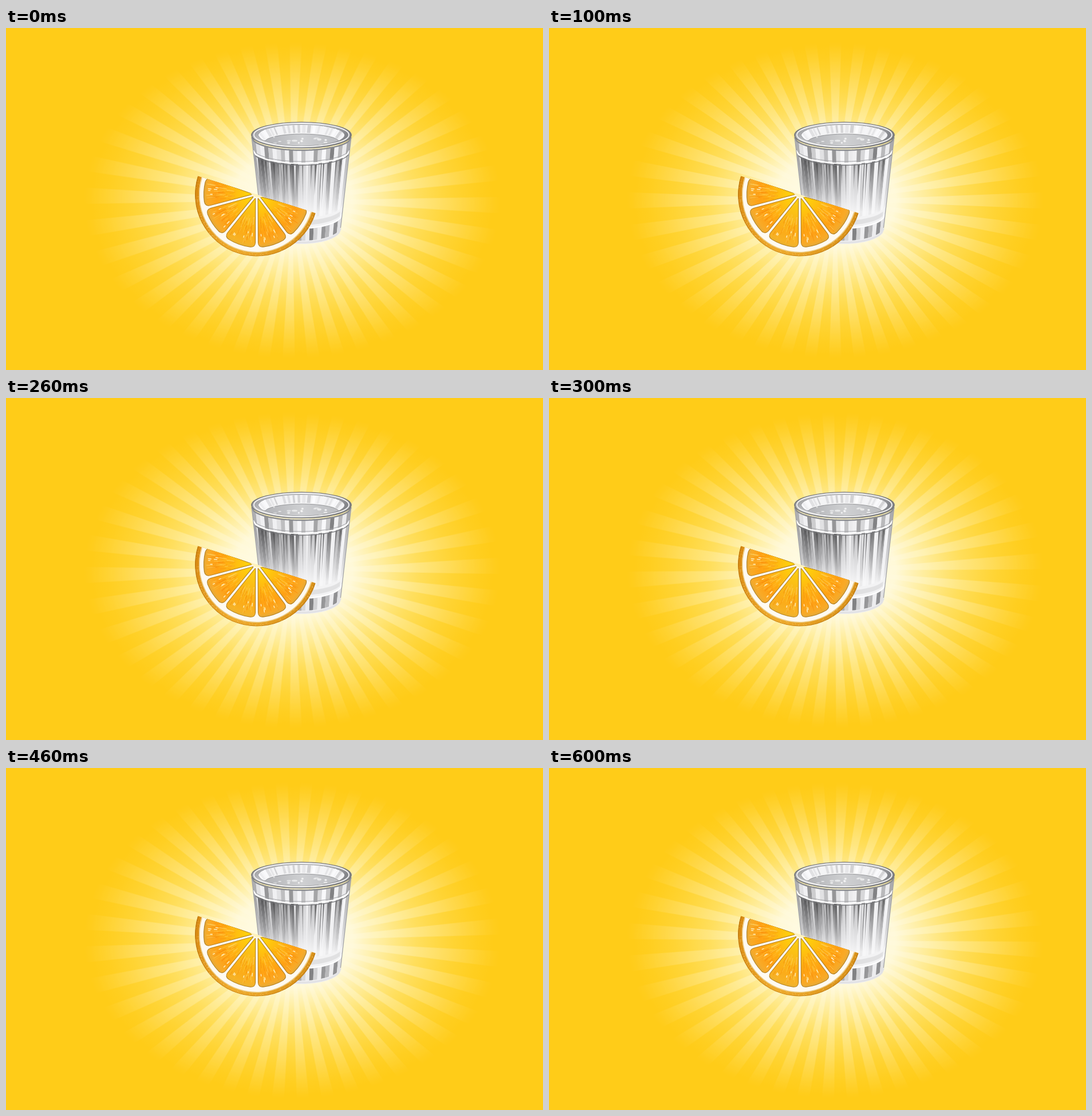
Animation of 938 by 597 pixels, one loop 0.7 s. Source, as an HTML page:

```html
<!DOCTYPE html>
<html lang="en">
<head>
<meta charset="utf-8">
<title>Shot and orange</title>
<style>
  html, body { margin: 0; width: 100%; height: 100%; overflow: hidden; background: #ffcc18; }
  svg { display: block; width: 100vw; height: 100vh; }
  /* One ray spacing per loop, so the turn is seamless */
  #rays { transform-origin: 500px 301px; animation: turn 700ms steps(7) infinite; }
  @keyframes turn {
    from { transform: rotate(1.3deg); }
    to { transform: rotate(-7.7deg); }
  }
</style>
</head>
<body>
<svg viewBox="0 0 938 597" preserveAspectRatio="none">
  <defs>
    <radialGradient id="glow">
      <stop offset="0" stop-color="#fffef4"/>
      <stop offset=".3" stop-color="#fffce6" stop-opacity=".93"/>
      <stop offset=".46" stop-color="#fff9cc" stop-opacity=".7"/>
      <stop offset=".62" stop-color="#fff6b4" stop-opacity=".44"/>
      <stop offset=".8" stop-color="#fff3a0" stop-opacity=".2"/>
      <stop offset=".92" stop-color="#fff3a0" stop-opacity=".06"/>
      <stop offset="1" stop-color="#fff3a0" stop-opacity="0"/>
    </radialGradient>
    <radialGradient id="fade">
      <stop offset=".15" stop-color="#fff" stop-opacity=".45"/>
      <stop offset=".5" stop-color="#fff" stop-opacity=".34"/>
      <stop offset=".75" stop-color="#fff" stop-opacity=".2"/>
      <stop offset=".9" stop-color="#fff" stop-opacity=".08"/>
      <stop offset="1" stop-color="#fff" stop-opacity="0"/>
    </radialGradient>
    <mask id="oval" maskUnits="userSpaceOnUse" x="0" y="0" width="938" height="597">
      <ellipse cx="500" cy="301" rx="366" ry="278" fill="url(#fade)"/>
    </mask>

    <linearGradient id="rim" x2="1" y2=".25">
      <stop offset="0" stop-color="#77787b"/>
      <stop offset=".2" stop-color="#b9babc"/>
      <stop offset=".55" stop-color="#e2e3e4"/>
      <stop offset=".8" stop-color="#b2b3b6"/>
      <stop offset="1" stop-color="#85868a"/>
    </linearGradient>
    <linearGradient id="drink" x2="1">
      <stop offset="0" stop-color="#b2b3b6"/>
      <stop offset=".5" stop-color="#cfd0d2"/>
      <stop offset="1" stop-color="#bcbdc0"/>
    </linearGradient>
    <linearGradient id="haze" x2="0" y2="1">
      <stop offset=".15" stop-color="#f4f4f6" stop-opacity="0"/>
      <stop offset=".55" stop-color="#f4f4f6" stop-opacity=".42"/>
      <stop offset=".9" stop-color="#f8f8f9" stop-opacity=".9"/>
    </linearGradient>
    <clipPath id="mouth"><ellipse cx="516" cy="187" rx="75" ry="18.5"/></clipPath>
    <filter id="soft" x="-5%" y="-5%" width="110%" height="110%"><feGaussianBlur stdDeviation=".7"/></filter>

    <linearGradient id="peel" x2="1">
      <stop offset="0" stop-color="#d98a12"/>
      <stop offset=".45" stop-color="#efab2c"/>
      <stop offset="1" stop-color="#d9921a"/>
    </linearGradient>
    <radialGradient id="pulp" gradientUnits="userSpaceOnUse" cx="0" cy="0" r="94">
      <stop offset=".05" stop-color="#ffdc08"/>
      <stop offset=".4" stop-color="#ffbc10"/>
      <stop offset=".75" stop-color="#ffa014"/>
      <stop offset=".92" stop-color="#f8aa28"/>
      <stop offset="1" stop-color="#dfa93c"/>
    </radialGradient>
    <clipPath id="half"><path d="M-108 0A108 108 0 0 0 108 0Z"/></clipPath>
  </defs>

  <rect width="938" height="597" fill="#ffcc18"/>
  <ellipse cx="500" cy="301" rx="352" ry="270" fill="url(#glow)"/>
  <g mask="url(#oval)"><g id="rays" fill="#fffbe0"></g></g>

  <g id="glass">
    <g id="body" filter="url(#soft)"></g>
    <g id="lines" fill="none"></g>
    <ellipse cx="516" cy="187" rx="87" ry="22.5" fill="url(#rim)" stroke="#737477" stroke-width="1.6"/>
    <ellipse cx="516" cy="186.5" rx="83" ry="20.5" fill="none" stroke="#f0f0f1" stroke-width="2"/>
    <ellipse cx="516" cy="187" rx="75" ry="18.5" fill="#f4f4f5" stroke="#9a9b9e" stroke-width="1.2"/>
    <g id="inside" clip-path="url(#mouth)"></g>
  </g>

  <g id="orange" transform="translate(438 290.5) rotate(17.5)" clip-path="url(#half)">
    <path d="M-108 0A108 108 0 0 0 108 0Z" fill="url(#peel)"/>
    <path d="M-107 1A107 107 0 0 0 107 1" fill="none" stroke="#b87512" stroke-width="2" opacity=".65"/>
    <g id="specks" fill="#ffe7a6"></g>
    <path d="M-101 0A101 101 0 0 0 101 0Z" fill="#fffaf0"/>
    <path d="M-100 1A100 100 0 0 0 100 1" fill="none" stroke="#edcb82" stroke-width="1.5"/>
    <g id="wedges" stroke-linecap="round"></g>
  </g>
</svg>

<script>
const $ = id => document.getElementById(id);

function add(parent, tag, attrs) {
  const node = document.createElementNS('http://www.w3.org/2000/svg', tag);
  for (const key in attrs) node.setAttribute(key, attrs[key]);
  parent.appendChild(node);
  return node;
}

let seed = 11;
const rand = (lo = 0, hi = 1) => {
  seed = (seed * 16807) % 2147483647;
  return lo + (hi - lo) * seed / 2147483647;
};
const polar = (r, a, x = 0, y = 0) => [x + r * Math.cos(a), y + r * Math.sin(a)];
const poly = points => 'M' + points.map(p => p.map(n => n.toFixed(1)).join(' ')).join('L') + 'Z';
const rad = Math.PI / 180;
const grey = v => `rgb(${v},${v},${v + 2})`;

// Sunburst: 40 equal wedges
for (let i = 0; i < 40; i++) {
  const a = i * 9 * rad, half = 2.25 * rad;
  add($('rays'), 'path', {
    d: poly([[500, 301], polar(380, a - half, 500, 301), polar(380, a + half, 500, 301)])
  });
}

// Glass wall: s runs left to right (-1..1), v from rim to foot (0..1)
const wall = (s, v) => [
  516 + (87 - 19 * v) * s,
  190 + 162 * v + (22.5 + 2.5 * v) * Math.sqrt(Math.max(0, 1 - s * s))
];
const arc = (v, s0 = -1, s1 = 1, n = 40) =>
  Array.from({ length: n + 1 }, (_, i) => wall(s0 + (s1 - s0) * i / n, v));
const panel = (s0, s1, v0, v1, n) => poly([...arc(v0, s0, s1, n), ...arc(v1, s0, s1, n).reverse()]);

function flutes(v0, v1, tones) {
  const n = tones.length;
  tones.forEach((tone, i) => {
    const s0 = -1 + 2 * i / n;
    add($('body'), 'path', { d: panel(s0, s0 + 2 / n, v0, v1, 4), fill: grey(tone) });
  });
}

add($('body'), 'path', { d: panel(-1, 1, 0, 1), fill: '#f0f0f2' });
flutes(0, .14, [175, 225, 240, 150, 205, 240, 225, 190, 240, 150, 225, 245, 195,
  235, 240, 165, 215, 248, 200, 130, 240, 185, 235, 170]);
flutes(.15, .72, [165, 112, 92, 128, 150, 102, 125, 165, 100, 145, 180, 88, 110, 200, 208,
  212, 204, 196, 228, 130, 236, 210, 120, 238, 175, 140, 240, 185]);
for (let i = 0; i < 22; i++) {
  const s = -.94 + i * .087, v = rand(.4, .7);
  add($('body'), 'path', {
    d: poly([...arc(.16, s, s + rand(.02, .045), 2), wall(s + .015, v)]),
    fill: i % 3 ? grey(Math.round(rand(60, 105))) : '#fafafb',
    opacity: .8
  });
}
add($('body'), 'path', { d: panel(-1, 1, .15, .73), fill: 'url(#haze)' });
add($('body'), 'path', { d: panel(-1, 1, .72, .83), fill: '#f3f3f4' });
flutes(.84, .965, [225, 235, 190, 235, 200, 235, 180, 225, 240, 175, 215, 238,
  130, 210, 238, 150, 185, 236, 145, 225]);
add($('body'), 'path', { d: panel(.05, .93, .75, .8, 12), fill: '#cfd0d2', opacity: .5 });

const line = (v, s0, s1, stroke, width) => add($('lines'), 'path', {
  d: poly(arc(v, s0, s1)).slice(0, -1), stroke, 'stroke-width': width
});
line(.005, -1, 1, '#8c8d90', 2.5);
line(.125, -1, 1, '#a2a3a6', 1);
line(.145, -1, 1, '#fdfdfd', 2.4);
line(.165, -.96, .98, '#77787b', 1.2);
line(.83, -1, 1, '#ffffff', 2);
line(.985, -1, 1, '#e2e2e5', 3.5);
for (const s of [-1, 1]) {
  add($('lines'), 'path', {
    d: poly([wall(s, .01), wall(s, .98)]), stroke: '#a2a3a6', 'stroke-width': 1.3
  });
}

// Inner wall, drink surface and bubbles
for (let i = 0; i < 26; i++) {
  const a = (180 + i * 7.2) * rad, c = Math.cos(a), k = Math.sin(a);
  add($('inside'), 'path', {
    d: `M${516 + 75 * c} ${187 + 18 * k}L${516 + 66 * c} ${198 + 15 * k}`,
    stroke: grey(Math.round(rand(205, 252))), 'stroke-width': rand(2, 6).toFixed(1)
  });
}
add($('inside'), 'ellipse', {
  cx: 517, cy: 199, rx: 65, ry: 14, fill: 'url(#drink)', stroke: '#97989b', 'stroke-width': 1
});
for (let i = 0; i < 16; i++) {
  add($('inside'), 'ellipse', {
    cx: rand(468, 566).toFixed(1), cy: rand(190, 204).toFixed(1),
    rx: rand(1.5, 5).toFixed(1), ry: rand(.8, 2).toFixed(1),
    fill: '#fafafa', opacity: rand(.4, .9).toFixed(2)
  });
}

// Orange: five wedges between pale membranes, open at the cut
for (let i = 0; i < 110; i++) {
  const [cx, cy] = polar(rand(102, 107), rand(2, 178) * rad);
  add($('specks'), 'circle', { cx, cy, r: rand(.3, .7), opacity: rand(.3, .8) });
}

const edges = [-3, 35.5, 72.5, 111.5, 147.5, 183];
for (let i = 0; i < 5; i++) {
  const a0 = edges[i] * rad, a1 = edges[i + 1] * rad, mid = (a0 + a1) / 2;
  const tip = polar(8, mid), inset = 2 * rad;
  const p = polar(84, a0 + inset), q = polar(84, a1 - inset);
  const p2 = polar(92, a0 + 3.5 * inset), q2 = polar(92, a1 - 3.5 * inset);
  const pc = polar(92, a0 + inset), qc = polar(92, a1 - inset);
  const shape = `M${tip}L${p}Q${pc} ${p2}A92 92 0 0 1 ${q2}Q${qc} ${q}Z`;
  const wedges = $('wedges');
  add(wedges, 'path', {
    d: shape, fill: '#a9771c', stroke: '#a9771c', 'stroke-width': 2, 'stroke-linejoin': 'round'
  });
  add(wedges, 'path', { d: shape, fill: 'url(#pulp)' });
  if (i === 2) add(wedges, 'path', { d: shape, fill: '#f2c020', opacity: .35 });

  const streak = (r0, r1, a, stroke, width, opacity) => add(wedges, 'path', {
    d: `M${polar(r0, a)}L${polar(r1, a)}`, stroke, 'stroke-width': width, opacity
  });
  for (let j = 0; j < 46; j++) {
    const a = rand(a0 + .1, a1 - .1), r = rand(36, 78);
    const color = ['#f98a0a', '#ffc83c', '#f3930f', '#ffdc70'][j % 4];
    streak(r, Math.min(88, r + rand(5, 16)), a, color, rand(.6, 1.5), rand(.35, .75));
  }
  for (let j = 0; j < 5; j++) {
    const a = rand(a0 + .1, a1 - .1), r = rand(66, 82);
    streak(r, r + rand(2, 5), a, '#fff6cf', 1.5, .9);
  }
}
add($('wedges'), 'path', { d: 'M-12 0Q0 10 12 0Z', fill: '#fff3bd' });
</script>
</body>
</html>
```
